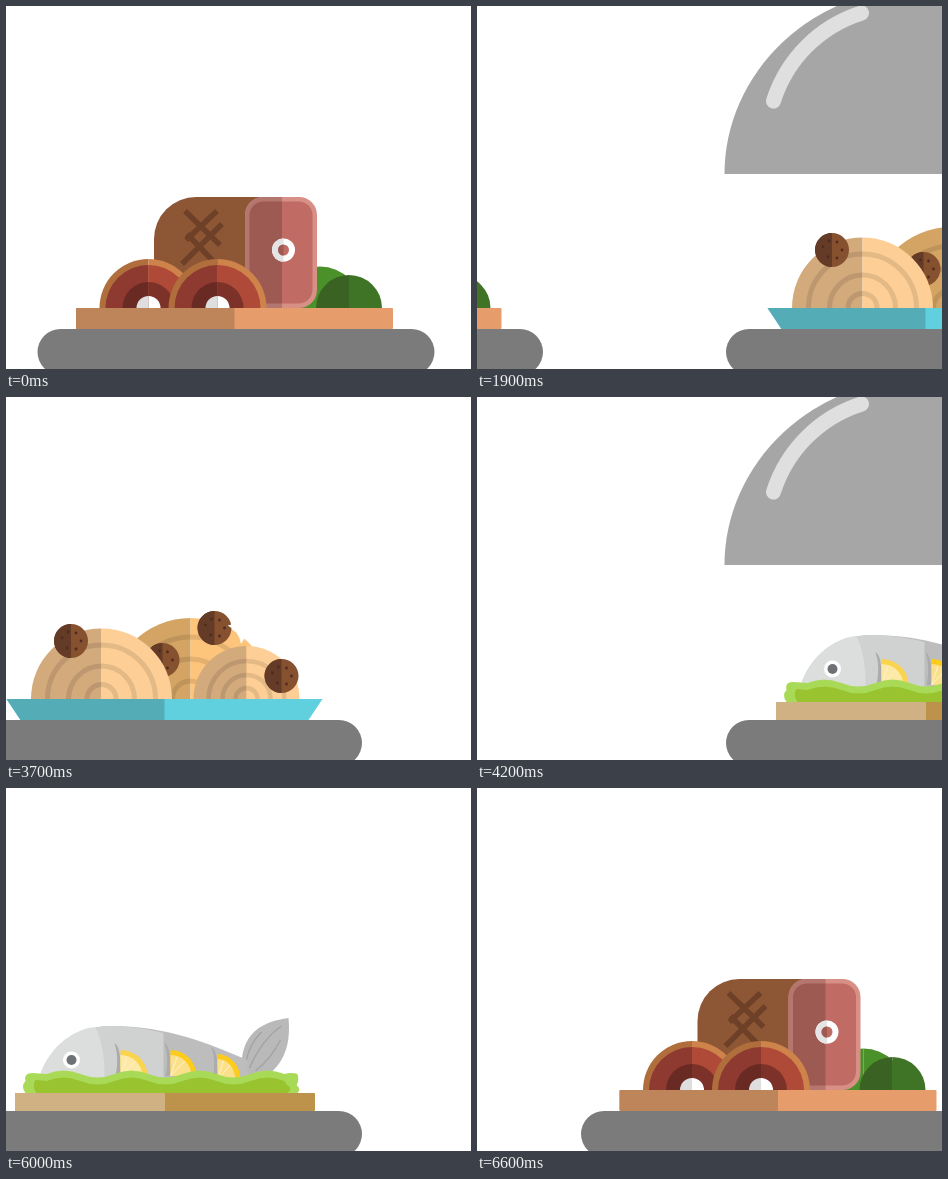
Write an HTML page that moves like this. It is 465 px wide and 363 px high and loops after 6.7 s.

```html
<!DOCTYPE html>
<html lang="en">
<head>
<meta charset="utf-8">
<title>Dishes</title>
<style>
  html, body { margin: 0; width: 100%; height: 100%; overflow: hidden; background: #fff; }
  svg { display: block; width: 100%; height: 100%; }
</style>
</head>
<body>
<svg id="stage" viewBox="0 0 465 363"></svg>
<script>
const LOOP = 6700, HOLD = 1500, STEP = 100, STRIDE = 72.5;
const TABLE = 302;

const path = (d, fill) => `<path d="${d}" fill="${fill}"/>`;
const line = (d, stroke, width, cap = 'butt') =>
  `<path d="${d}" fill="none" stroke="${stroke}" stroke-width="${width}" stroke-linecap="${cap}"/>`;
const circle = (x, y, r, fill) => `<circle cx="${x}" cy="${y}" r="${r}" fill="${fill}"/>`;
const rect = (x, y, w, h, fill, r = 0) =>
  `<rect x="${x}" y="${y}" width="${w}" height="${h}" rx="${r}" fill="${fill}"/>`;

// Two-tone shapes: shaded left side, lit right side.
const disc = (x, y, r, [dark, light]) =>
  circle(x, y, r, light) + path(`M${x},${y - r}a${r},${r} 0 0 0 0,${2 * r}z`, dark);
const dome = (x, r, [dark, light]) =>
  path(`M${x - r},${TABLE}a${r},${r} 0 0 1 ${r},${-r}v${r}z`, dark) +
  path(`M${x},${TABLE - r}a${r},${r} 0 0 1 ${r},${r}h${-r}z`, light);
const arch = (x, r, [dark, light], width) =>
  line(`M${x - r},${TABLE}a${r},${r} 0 0 1 ${r},${-r}`, dark, width) +
  line(`M${x},${TABLE - r}a${r},${r} 0 0 1 ${r},${r}`, light, width);
const board = (x, y, w, [dark, light]) =>
  rect(x, y, w, 323 - y, light, 1) + rect(x, y, w / 2, 323 - y, dark, 1);

const tray = rect(31.5, 323, 397, 46, '#7b7b7b', 23);

function hamDish() {
  const steak = x =>
    dome(x, 49, ['#b06e3d', '#ce834b']) +
    dome(x, 43, ['#8f3a31', '#af4938']) +
    dome(x, 26, ['#692a24', '#7d3229']) +
    dome(x, 12, ['#dedede', '#ffffff']);
  const panel = (inset, r, [dark, light]) => {
    const x = 239 + inset, y = 191 + inset, w = 72 - 2 * inset, h = 111 - 2 * inset;
    return rect(x, y, w, h, light, r) +
      path(`M276,${y}H${x + r}a${r},${r} 0 0 0 ${-r},${r}v${h - 2 * r}a${r},${r} 0 0 0 ${r},${r}H276z`, dark);
  };
  return path('M280,191H190A42,42 0 0 0 148,233V302H280z', '#8d5735') +
    line('M179,205L214,239M211,205L180,234M216,218L176,258M181,228L208,256', '#6e4028', 5.5) +
    dome(314, 41.5, ['#4a9129', '#4a9129']) +
    dome(343, 33, ['#3a6323', '#3f7426']) +
    panel(0, 18, ['#b47770', '#d78f86']) +
    panel(4.5, 14, ['#9d5a53', '#c06c64']) +
    disc(277.5, 244, 11.5, ['#e4e4e4', '#ffffff']) +
    disc(277.5, 244, 5.5, ['#9d5a53', '#c06c64']) +
    steak(142.5) + steak(211.5) +
    board(70, TABLE, 317, ['#be855b', '#e79d6b']);
}

function noodleDish() {
  const nest = (x, r, tones, ringTones, rings, width) =>
    dome(x, r, tones) + rings.map(ring => arch(x, ring, ringTones, width)).join('');
  const pale = ['#d2aa7c', '#fdce95'], paleRing = ['#bc976f', '#e3b986'];
  const dots = [[-9, -3], [-4, 7], [-3, -9], [5, -8], [10, 0], [5, 8]];
  const ball = (x, y) => disc(x, y, 17, ['#643b26', '#86512f']) +
    dots.map(([dx, dy]) => circle(x + dx, y + dy, 1.4, '#502b20')).join('');
  return nest(257, 81, ['#d3a463', '#fdc47b'], ['#be945a', '#e4b06f'], [18, 40, 62], 5) +
    ball(229, 263) +
    nest(168, 70.5, pale, paleRing, [14.5, 33, 54], 5) +
    ball(137.5, 244) + ball(281, 231) +
    nest(313, 53, pale, paleRing, [11, 24, 38], 4.5) +
    ball(348, 279) +
    path('M73,302H389L375,323H87z', '#61d0de') +
    path('M73,302H231V323H87z', '#54acb7');
}

function fishDish() {
  const lemon = (x, y, r, rim, flesh) =>
    path(`M${x - 6},${y - 7}Q${x + 1},${y - 3} ${x},${y + 26}H${x - 5}Q${x - 1},${y + 8} ${x - 6},${y - 7}z`, '#ababab') +
    path(`M${x},${y}a${r},26 0 0 1 ${r},26h${-r}z`, rim) +
    path(`M${x},${y + 5}a${r - 5},21 0 0 1 ${r - 5},21h${5 - r}z`, flesh) +
    line(`M${x},${y + 26}l${r * .55},-15M${x},${y + 26}l${r * .25},-19`, '#fff3c9', 1);
  const ripple = height => `q17,${-height} 34,0` + 't34,0'.repeat(6);
  return path('M309,288C304,252 322,234 355,230C358,262 347,278 331,290z', '#b9b9b9') +
    line('M316,280Q328,252 348,238M322,283Q338,270 347,252M313,272Q316,256 328,244', '#a2a2a2', 1.3) +
    path('M106,290C114,260 143,238 177,238C235,238 276,256 314,272V290z', '#bdbdbd') +
    path('M106,290C114,260 143,238 177,238C197,238 214,241 230,245V290z', '#d0d1d1') +
    path('M106,290C113,262 138,241 162,239Q172,260 171,290z', '#dcdddd') +
    lemon(187, 262, 27, '#f9d44c', '#fce9a5') +
    lemon(237, 262, 26, '#fccb1c', '#fbe08b') +
    lemon(284, 266, 23, '#fccb1c', '#fbe08b') +
    circle(138, 272, 8.5, '#fff') + circle(138, 272, 5, '#6e7274') +
    path(`M92,305Q87,298 92,293Q90,285 99,285L113,286${ripple(7)}` +
      'Q358,284 364,286Q366,293 363,297Q368,301 364,305z', '#a9da57') +
    path(`M103,305Q98,298 102,292L113,293${ripple(7)}Q353,297 357,300Q357,303 354,305z`, '#99c32f') +
    board(81.5, 305, 300, ['#cfb184', '#bd924b']);
}

const cloche = path('M30,0A200,187 0 0 1 430,0z', '#a6a6a6') +
  line('M79,-73A135,135 0 0 1 167,-161', '#dfdfdf', 15, 'round');
const star = '<path d="M0,-16Q4,-4 16,0Q4,4 0,16Q-4,4 -16,0Q-4,-4 0,-16z" fill="#fff"/>';

const dishes = [
  { arrival: 0, art: hamDish(), glint: [353, 183] },
  { arrival: 2200, art: noodleDish(), glint: [368, 209] },
  { arrival: 4500, art: fishDish(), glint: [366, 209] }
];

const stage = document.getElementById('stage');
stage.innerHTML = dishes.map(dish =>
  `<g>${tray}${dish.art}<g>${star}</g><g>${cloche}</g></g>`).join('');
dishes.forEach((dish, i) => {
  dish.node = stage.children[i];
  [dish.starNode, dish.lidNode] = [...dish.node.children].slice(-2);
});

// Strides left before the dish is centred; negative once it leaves.
function stridesAway(time, arrival) {
  const lead = 1000;
  const since = (time - arrival + lead + LOOP) % LOOP - lead;
  if (since < 0) return Math.ceil(-since / STEP);
  return since < HOLD ? 0 : -Math.floor((since - HOLD) / STEP) - 1;
}

const glintShift = { '1': [-23, 59], '0': [0, 0], '-1': [-58, 22] };
const show = (node, visible) => node.setAttribute('display', visible ? 'inline' : 'none');
const move = (node, x, y, turn = 0) =>
  node.setAttribute('transform', `translate(${x} ${y}) rotate(${turn})`);

function render(time) {
  for (const { arrival, node, starNode, lidNode, glint } of dishes) {
    const away = stridesAway(time, arrival);
    show(node, Math.abs(away) < 8);
    move(node, away * STRIDE, 0);

    const shift = glintShift[away];
    show(starNode, shift);
    if (shift) move(starNode, glint[0] + shift[0], glint[1] + shift[1], 9);

    show(lidNode, away > 2);
    move(lidNode, 0, away > 3 ? 323 : 168);
  }
}

const start = performance.now();
function tick() {
  render((performance.now() - start) % LOOP);
  requestAnimationFrame(tick);
}
tick();
</script>
</body>
</html>
```
